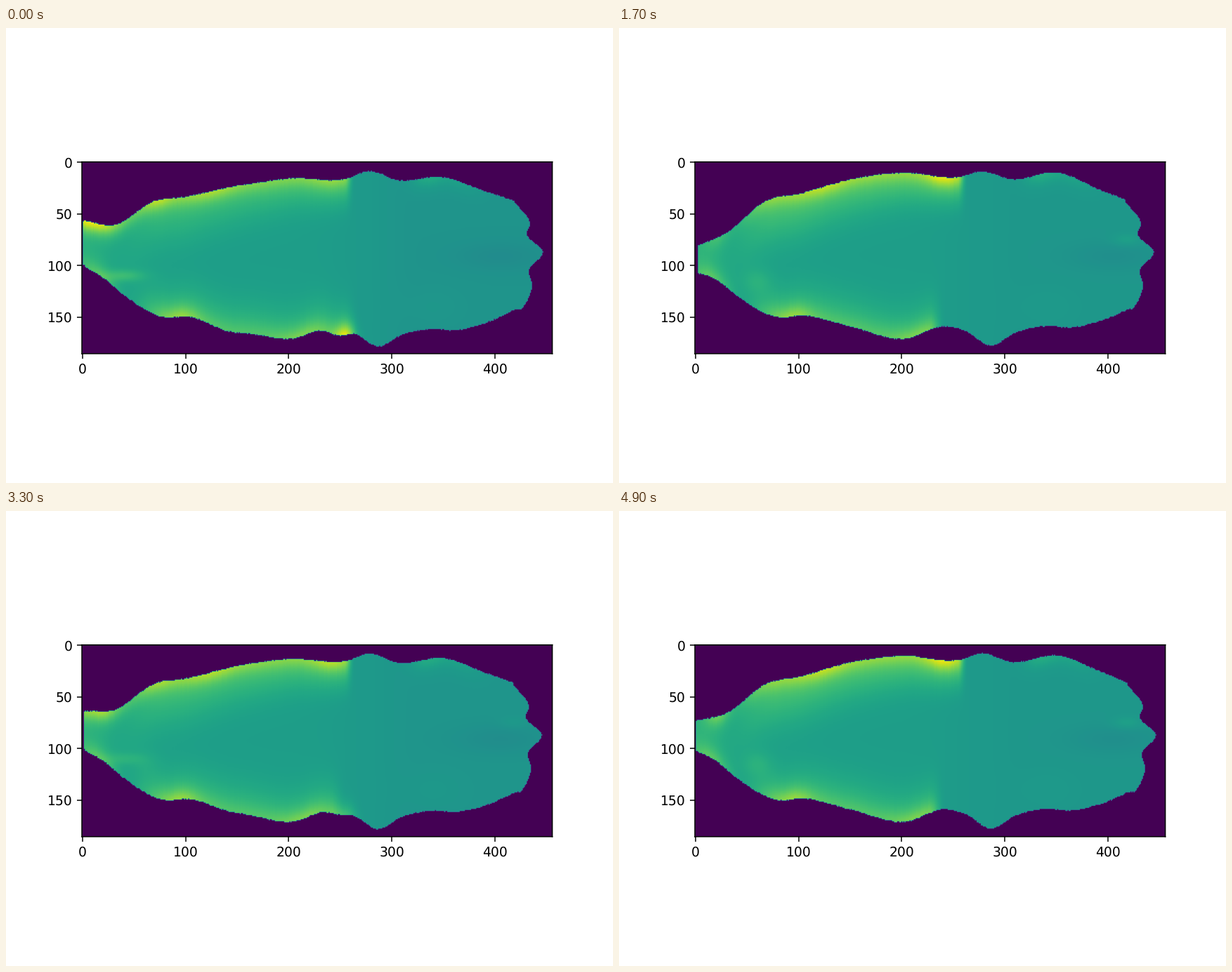
A matplotlib script that plays this animation: 864x648 px, repeating every 5 s.

```python
import numpy as np
import matplotlib.pyplot as plt
from matplotlib.animation import FuncAnimation

ROWS, COLS = 186, 456
FRAMES, INTERVAL = 50, 100

# Key points of the outline with the neck in its middle position.
TOP = [(0, 73.5), (30, 66), (70, 37), (100, 31), (150, 17), (200, 10.5),
       (258, 14), (277, 8), (305, 16.5), (352, 10.5), (392, 25.5), (420, 37)]
BOTTOM = [(0, 102), (20, 112), (40, 128.5), (80, 150), (103, 148.5), (150, 159),
          (202, 171), (243, 159), (262, 163.5), (286, 177.5), (310, 165),
          (342, 158.5), (360, 160), (396, 152.5), (420, 142)]
# Right end: column over row.
END = [(38, 418), (60, 433.5), (70, 430.5), (87, 446), (105, 432.5),
       (118, 435.5), (134, 431), (150, 419)]

# Neck height (-1 raised, 1 lowered) and inset of both ends over time.
KEY_MS = [0, 1100, 1700, 2800, 3700, 4400, 4900]
NECK = [-1, 1, .5, 0, -1, 0, 0]
INSET = [1, 3, 3, 1, 3, 3, 1]

x = np.arange(COLS)
y = np.arange(ROWS)[:, None]


def curve(points, at):
    """Smooth curve through the points, level beyond both ends."""
    px, py = np.array(points, float).T
    slope = np.gradient(py, px)
    at = np.clip(at, px[0], px[-1])
    i = np.clip(np.searchsorted(px, at, side="right") - 1, 0, len(px) - 2)
    step = px[i + 1] - px[i]
    t = (at - px[i]) / step
    return (py[i] * (1 + 2 * t) * (1 - t) ** 2 + py[i + 1] * t * t * (3 - 2 * t)
            + step * t * (1 - t) * (slope[i] * (1 - t) - slope[i + 1] * t))


def bump(center, width):
    return np.exp(-((x - center) / width) ** 2)


def blob(cx, cy, sx, sy):
    return bump(cx, sx) * np.exp(-((y - cy) / sy) ** 2)


def ramp(start, end):
    t = np.clip((x - start) / (end - start), 0, 1)
    return t * t * (3 - 2 * t)


def fade(depth, reach, power):
    return np.exp(-(depth / reach) ** power)


def outline(neck, raised, lowered, rng):
    top = (curve(TOP, x) + 16 * neck * np.exp(-(x / 28) ** 1.6)
           + raised * (6.5 * bump(170, 75) + 5 * bump(365, 45))
           + lowered * (3 * bump(280, 12) + 3 * bump(395, 30)))
    bottom = (curve(BOTTOM, x) + lowered * 10 * np.exp(-x / 18)
              + raised * (7 * bump(140, 28) + 8 * bump(247, 14)
                          + 3 * bump(345, 50) - 4 * np.exp(-x / 6)))
    top_rough, bottom_rough = rng.uniform(-.4, .4, (2, COLS))
    return top + top_rough, bottom + bottom_rough


def height_map(frame):
    ms = frame * INTERVAL
    neck = np.interp(ms, KEY_MS, NECK)
    inset = np.round(np.interp(ms, KEY_MS, INSET))
    raised, lowered = max(-neck, 0), max(neck, 0)
    top, bottom = outline(neck, raised, lowered, np.random.default_rng(frame))
    from_top = np.maximum(y - top, 0)
    from_bottom = np.maximum(bottom - y, 0)

    # Ridge along the middle, falling towards the right.
    value = (.528 + .03 * (1 - ramp(200, 330)) - raised * .012 * ramp(260, 330)
             + (.085 - .02 * raised) * np.exp(-(x / 38) ** 2))

    # Broad glow and bright rim along the top, cut off near column 260.
    upper = ramp(25, 80) * (1 - ramp(254, 264))
    value = value + (.14 - .03 * raised) * upper * fade(from_top, 50 - .09 * x, 2.5)
    rim = (upper * (.14 + .07 * bump(125, 22) + (.14 - .1 * raised) * bump(240, 16))
           + raised * (.36 * bump(10, 32) + .1 * bump(72, 14))
           + (1 - raised) * (1 - lowered) * .16 * bump(22, 12)
           + .09 * bump(335, 16) + .05 * bump(365, 20))
    value = value + rim * fade(from_top, 10, 1.5)

    # The same along the bottom, reaching further right when the neck is raised.
    end = 238 + 26 * raised
    lower = ramp(40, 80) * (1 - ramp(end - 12, end + 4))
    value = value + .1 * lower * fade(from_bottom, 30, 2)
    rim = (lower * (.07 + .12 * bump(95, 18) + .08 * bump(215, 25))
           + .12 * bump(15, 18) + raised * .25 * bump(255, 10))
    value = value + rim * fade(from_bottom, 11, 1.5)

    value = value - .03 * blob(405, 91, 45, 14) + .012 * blob(340, 140, 30, 20)
    value = value + raised * .1 * blob(40, 110, 20, 6)
    value = value + (1 - raised) * (.045 * blob(418, 75, 14, 6) + .05 * blob(60, 115, 14, 12))

    tip = curve(END, y) + 1 - inset
    inside = (y >= top) & (y <= bottom) & (x >= inset) & (x <= tip)
    return np.where(inside, np.clip(value, 0, 1), 0)


plt.rcParams["text.hinting"] = "no_hinting"
fig, ax = plt.subplots(figsize=(6.4, 4.8), dpi=135)
image = ax.imshow(height_map(0), cmap="viridis", vmin=0, vmax=1)
for spine in ax.spines.values():
    spine.set_snap(False)


def update(frame):
    image.set_data(height_map(frame))
    return [image]


animation = FuncAnimation(fig, update, frames=FRAMES, interval=INTERVAL,
                          repeat=True, repeat_delay=0)
plt.show()
```
